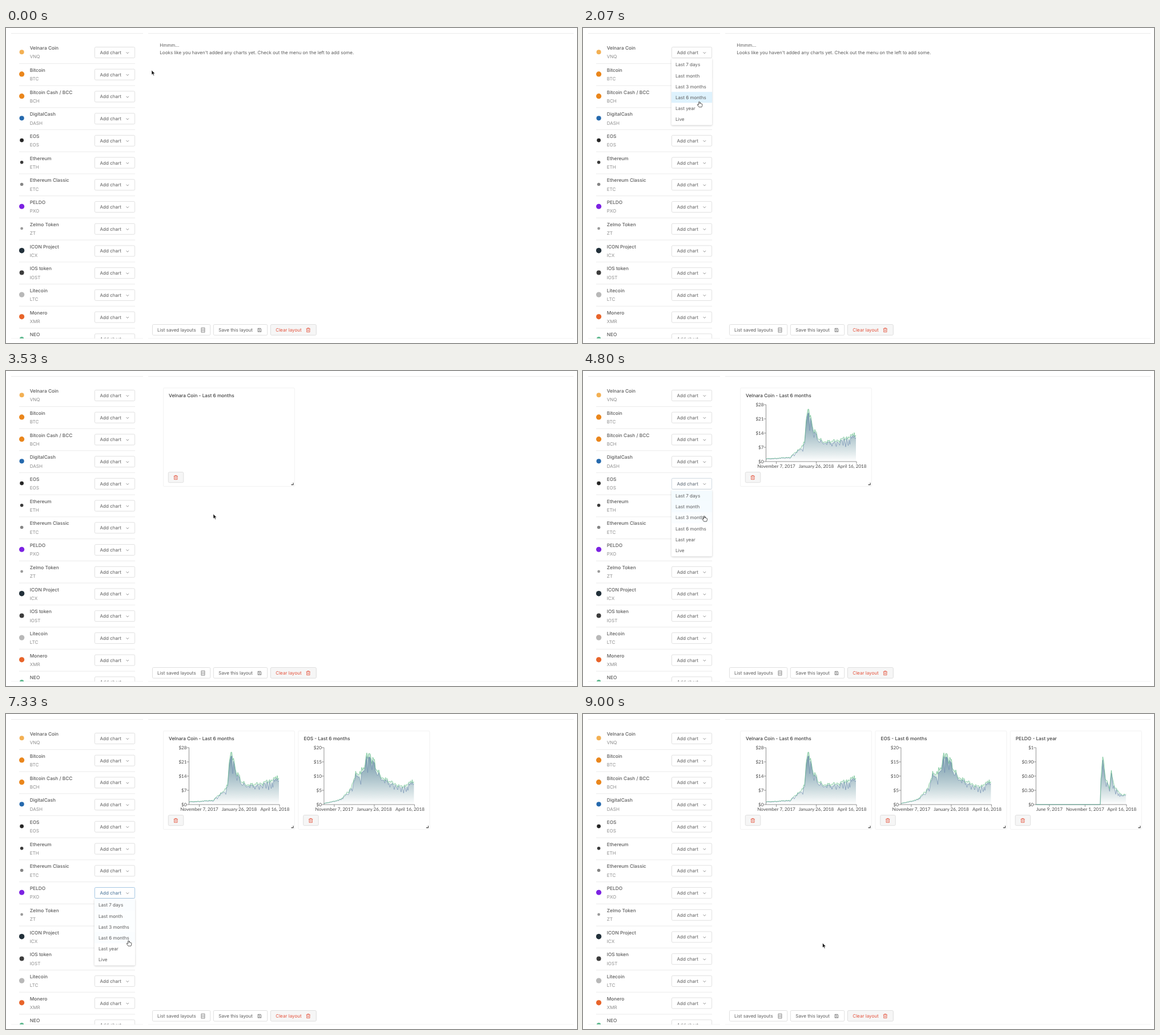
Animation of 1000x553 px, one loop 9.07 s. Source, as an HTML page:

```html
<!DOCTYPE html>
<html lang="en">
<head>
<meta charset="utf-8">
<title>Chart dashboard</title>
<style>
  html, body { margin: 0; height: 100%; overflow: hidden; background: #fff; }
  svg { display: block; width: 100vw; height: 100vh; }
  text { font: 8.05px Inter, sans-serif; fill: #5c5c5c; text-rendering: geometricPrecision; }
  .name { font-size: 8.3px; font-weight: 500; }
  .code { fill: #8c8c8c; }
  .title { font-size: 8.3px; font-weight: 500; fill: #404040; }
  .axis text { font: 8.1px Lato, sans-serif; fill: #4c4c4c; }
  .axis path { stroke: #777; stroke-width: .8; fill: none; }
  .line { stroke: #e6e6e6; stroke-width: .8; }
  .box { fill: #fff; stroke: #d9d9d9; stroke-width: .8; }
  .grey { fill: #f6f6f6; }
  .icon { fill: none; stroke: #777; stroke-width: .8; }
  .red { stroke: #e5533d; }
  text.red { stroke: none; fill: #e5533d; }
</style>
</head>
<body>
<svg id="stage" viewBox="0 0 1000 553"></svg>
<script>
const LOOP = 9070, ROW = 38.72, ITEM = 19.1, PLOT_WIDTH = 158.5, BASE = 159;
const stage = document.getElementById('stage');

// name, code, icon colour, icon radius
const coins = [
  ['Velnara Coin', 'VNQ', '#f3b053', 4],
  ['Bitcoin', 'BTC', '#ea861c', 4.6],
  ['Bitcoin Cash / BCC', 'BCH', '#ea861c', 4.6],
  ['DigitalCash', 'DASH', '#2569ad', 4.1],
  ['EOS', 'EOS', '#262626', 3.4],
  ['Ethereum', 'ETH', '#3a3a3a', 2.8],
  ['Ethereum Classic', 'ETC', '#858585', 2.8],
  ['PELDO', 'PXO', '#7c22e2', 4.6],
  ['Zelmo Token', 'ZT', '#9a9a9a', 2.4],
  ['ICON Project', 'ICX', '#22303a', 4.7],
  ['IOS token', 'IOST', '#3c3c3c', 4],
  ['Litecoin', 'LTC', '#b8b8b8', 4.7],
  ['Monero', 'XMR', '#e8642a', 4.6],
  ['NEO', 'NEO', '#5fb98f', 3.6]
];
const periods = ['Last 7 days', 'Last month', 'Last 3 months', 'Last 6 months', 'Last year', 'Live'];

// Menu opens at `open`, an item is clicked at `click`, prices arrive at `drawn`.
// trend: a few [x, height] points that seeded noise roughens
const halfYear = [[18, 'November 7, 2017'], [88, 'January 26, 2018'], [PLOT_WIDTH, 'April 16, 2018']];
const charts = [
  { row: 0, period: 3, open: 1000, click: 2400, drawn: 3800, dates: halfYear,
    prices: ['$0', '$7', '$14', '$21', '$28'],
    trend: [[0, 5], [42, 7], [56, 20], [68, 33], [71, 82], [77, 84], [81, 58], [98, 34], [130, 37], [159, 48]] },
  { row: 4, period: 3, open: 4470, click: 5200, drawn: 5700, dates: halfYear,
    prices: ['$0', '$5', '$10', '$15', '$20'],
    trend: [[0, 2], [30, 9], [48, 28], [55, 54], [70, 60], [76, 87], [90, 71], [98, 49], [136, 30], [159, 42]] },
  { row: 7, period: 4, open: 7010, click: 7620, drawn: 8480,
    dates: [[23.5, 'June 9, 2017'], [86, 'November 1, 2017'], [PLOT_WIDTH, 'April 16, 2018']],
    prices: ['$0', '$0.30', '$0.60', '$0.90', '$1'],
    trend: [[0, 0], [113, 0], [114, 50], [117, 85], [121, 48], [129, 30], [132, 56], [136, 33], [151, 15], [159, 20]] }
];

// Pointer moves: start time, end time, destination
const home = [255, 74];
const moves = [
  [300, 900, 200, 45], [1500, 1900, 203.5, 129],
  [2400, 3300, 363, 251], [3900, 4420, 200, 198], [4560, 4933, 217, 277],
  [5200, 5800, 350, 293], [6500, 6980, 200, 314], [7200, 7373, 217, 412],
  [7620, 8400, 419.5, 402]
];

const clamp = v => Math.max(0, Math.min(1, v));
const smooth = v => v * v * (3 - 2 * v);
const progress = (t, start, end) => smooth(clamp((t - start) / (end - start)));
const lerp = (a, b, k) => a + (b - a) * k;
const buttonY = row => 43 + ROW * row;

const text = (x, y, value, attrs = '') => `<text x="${x}" y="${y}" ${attrs}>${value}</text>`;
const box = (x, y, w, h, cls = '') =>
  `<rect class="box ${cls}" x="${x}" y="${y}" width="${w}" height="${h}" rx="2"/>`;
const line = (x1, x2, y, attrs = '') => `<path class="line" d="M${x1} ${y}H${x2}" ${attrs}/>`;
const icon = (x, y, d, cls = '') =>
  `<path class="icon ${cls}" transform="translate(${x} ${y})" d="${d}"/>`;

const trash = 'M-3.6-2.3H3.6M-1.5-2.3V-3.6H1.5V-2.3M-2.7-2.3V3.5H2.7V-2.3M-.9-.5V2M.9-.5V2';
const sheet = 'M-3-4H3V4H-3ZM-3-1.3H3M-3 1.4H3';
const floppy = 'M-3-3H1.8L3-1.8V3H-3ZM-1.5-3V-1H1.2V-3M-1.3 3V1H1.3V3';

function coinRow([name, code, color, radius], i) {
  const y = buttonY(i);
  return `<circle cx="27.6" cy="${y - .8}" r="${radius}" fill="${color}"/>`
    + text(41.7, y - 4.9, name, 'class="name"')
    + text(41.7, y + 10.4, code, 'class="code"')
    + line(23, 226, y + 19.4)
    + `<g class="add">${box(155.4, y - 9.5, 70.2, 19)}${text(164.5, y + 3, 'Add chart')}</g>`
    + icon(212.8, y + .6, 'M-2.2-1.2L0 1.2L2.2-1.2');
}

function trendAt(trend, x) {
  const i = trend.findIndex(p => p[0] > x);
  const [x0, h0] = trend[i - 1], [x1, h1] = trend[i];
  return lerp(h0, h1, (x - x0) / (x1 - x0));
}

function areas(trend) {
  let seed = 11;
  const random = () => (seed = seed * 16807 % 2147483647) / 2147483647;
  const highs = [], lows = [];
  for (let x = 0; x <= PLOT_WIDTH; x += 1.5) {
    const high = trendAt(trend, x) * (.9 + .22 * random());
    const low = high * (.93 - .3 * random() ** 6);
    highs.push(`${x} ${(BASE - high).toFixed(1)}`);
    lows.push(`${x} ${(BASE - low).toFixed(1)}`);
  }
  const fill = (points, name) => `<path d="M0 ${BASE}L${points.join('L')}V${BASE}Z" fill="url(#${name})"/>`;
  const stroke = (points, color) =>
    `<path d="M${points.join('L')}" fill="none" stroke="${color}" stroke-width=".7"/>`;
  return fill(highs, 'green') + fill(lows, 'blue') + stroke(lows, '#6f8bb0') + stroke(highs, '#62bd87');
}

function card({ row, period, prices, dates, trend }, i) {
  const yTicks = prices.map((_, n) => `M-4 ${BASE - 25 * n}H0`).join('');
  const xTicks = dates.map(([x]) => `M${x} ${BASE}v4`).join('');
  const labels = prices.map((p, n) => text(-4, 162 - 25 * n, p, 'text-anchor="end"')).join('')
    + dates.map(([x, d]) => text(Math.min(x, 150.5), 170, d, 'text-anchor="middle"')).join('');
  return `<g class="card" transform="translate(${275.5 + 236.4 * i} 0)">
    <rect y="29.8" width="230" height="172.7" rx="1.5" fill="#fff" stroke="#efefef" stroke-width=".8"/>
    ${text(9.5, 46, `${coins[row][0]} - ${periods[period]}`, 'class="title"')}
    ${box(8.8, 177.5, 26.5, 18.3, 'grey')}${icon(21.8, 187, trash, 'red')}
    <path d="M227.6 196.3V199.6H224" fill="none" stroke="#444" stroke-width="1.1"/>
    <g class="chart" transform="translate(45 0)">
      <clipPath id="reveal${i}"><rect x="-1" y="50" height="112"/></clipPath>
      <g class="axis"><path d="M0 59V${BASE}H${PLOT_WIDTH}${yTicks}${xTicks}"/>${labels}</g>
      <g clip-path="url(#reveal${i})">${areas(trend)}</g>
    </g></g>`;
}

const gradient = (id, color, opacity) =>
  `<linearGradient id="${id}" gradientUnits="userSpaceOnUse" x1="0" y1="59" x2="0" y2="${BASE}">
    <stop stop-color="${color}" stop-opacity="${opacity}"/>
    <stop offset="1" stop-color="${color}" stop-opacity="0"/></linearGradient>`;

stage.innerHTML = `<defs>${gradient('green', '#6db890', .45)}${gradient('blue', '#4a6f96', .75)}
    <clipPath id="listArea"><rect width="241" height="545"/></clipPath></defs>
  ${line(9, 240, 9.5)}${line(249, 994, 9.5)}
  ${line(9, 240, 545, 'opacity=".6"')}${line(249, 994, 545, 'opacity=".6"')}
  <g clip-path="url(#listArea)">${coins.map(coinRow).join('')}</g>
  <g id="hint">${text(269.3, 33.3, 'Hmmm...')}
    ${text(269.3, 46, "Looks like you haven't added any charts yet. Check out the menu on the left to add some.")}</g>
  ${charts.map(card).join('')}
  ${box(256.5, 520.5, 101.3, 18.8)}${text(265, 533.2, 'List saved layouts')}${icon(345, 530.3, sheet)}
  ${box(363.4, 520.5, 94.4, 18.8)}${text(372.3, 533.2, 'Save this layout')}${icon(444, 530.3, floppy)}
  ${box(463.4, 520.5, 80, 18.8, 'grey')}${text(472.3, 533.2, 'Clear layout', 'class="red"')}
  ${icon(529.3, 530.3, trash, 'red')}
  <g id="menu">
    <rect x="154.8" y="10.5" width="71.4" height="117" rx="2" fill="#fff"
      style="filter:drop-shadow(0 1px 1.5px rgba(0,0,0,.2))"/>
    ${periods.map((p, i) => `<rect class="item" x="154.8" y="${11.9 + ITEM * i}" width="71.4"
      height="${ITEM}" fill="#def2fd"/>${text(162, 24.4 + ITEM * i, p)}`).join('')}
  </g>
  <path id="arrow" d="M0 0V8.3L1.9 6.6L3.2 9.5L4.6 8.9L3.3 6.1H5.8Z" fill="#111" stroke="#fff" stroke-width=".6"/>
  <path id="hand" d="M-.9.8Q0-.6.9.8V3.6Q2-.1 2.5 3.8Q3.7 3 4 4.3Q5.4 3.8 5.4 5.2
    Q5.5 7.6 4.4 9.8H-.5L-3.2 6Q-3.4 4.4-1.9 5.1L-.9 6Z" fill="#fff" stroke="#333" stroke-width=".8"/>`;

const all = selector => [...stage.querySelectorAll(selector)];
const [hint, menu, arrow, hand] = ['#hint', '#menu', '#arrow', '#hand'].map(s => all(s)[0]);
const cards = all('.card'), plots = all('.chart'), reveals = all('clipPath[id^=reveal] rect');
const items = all('.item'), addButtons = all('.add');
const show = (node, on) => node.setAttribute('visibility', on ? 'visible' : 'hidden');

function pointerAt(t) {
  let [x, y] = home;
  for (const [start, end, toX, toY] of moves) {
    const k = progress(t, start, end);
    x = lerp(x, toX, k);
    y = lerp(y, toY, k);
  }
  return [x, y];
}

const overBand = ([x, y], middle, half) => x > 155 && x < 226 && Math.abs(y - middle) < half;

// Hover colour fades: share of the last 200 ms that the pointer spent within a band
function glow(t, middle, half) {
  let hits = 0;
  for (let ago = 0; ago < 200; ago += 10) hits += overBand(pointerAt(t - ago), middle, half);
  return hits / 20;
}

const mix = (a, b, k) => `rgb(${a.map((v, i) => Math.round(lerp(v, b[i], k)))})`;

function draw(t) {
  show(hint, t < charts[0].click);
  charts.forEach(({ click, drawn }, i) => {
    show(cards[i], t >= click);
    show(plots[i], t >= drawn);
    reveals[i].setAttribute('width', 161 * progress(t, drawn, drawn + 500));
  });

  const active = charts.find(({ open, click }) => t >= open && t < click);
  show(menu, active);
  if (active) {
    const y = buttonY(active.row), k = progress(t, active.open, active.open + 150);
    const scale = lerp(.8, 1, k);
    menu.setAttribute('opacity', k);
    menu.setAttribute('transform', `translate(0 ${y + 10 * (1 - scale)}) scale(1 ${scale})`);
    items.forEach((item, i) => item.setAttribute('opacity', glow(t, y + 21.4 + ITEM * i, ITEM / 2)));
  }

  const pointer = pointerAt(t);
  const nearest = Math.round((pointer[1] - 43) / ROW);
  const pointing = active ? overBand(pointer, 276, 276) : overBand(pointer, buttonY(nearest), 9.5);
  show(arrow, !pointing);
  show(hand, pointing);
  for (const node of [arrow, hand]) node.setAttribute('transform', `translate(${pointer})`);

  addButtons.forEach((button, i) => {
    const covered = active && active.row !== i;
    const k = covered ? 0 : glow(t, buttonY(i), 9.5);
    button.children[0].style.stroke = mix([217, 217, 217], [64, 150, 220], k);
    button.children[1].style.fill = mix([92, 92, 92], [50, 135, 210], k);
  });
}

function frame() {
  draw(performance.now() % LOOP);
  requestAnimationFrame(frame);
}
frame();
</script>
</body>
</html>
```
